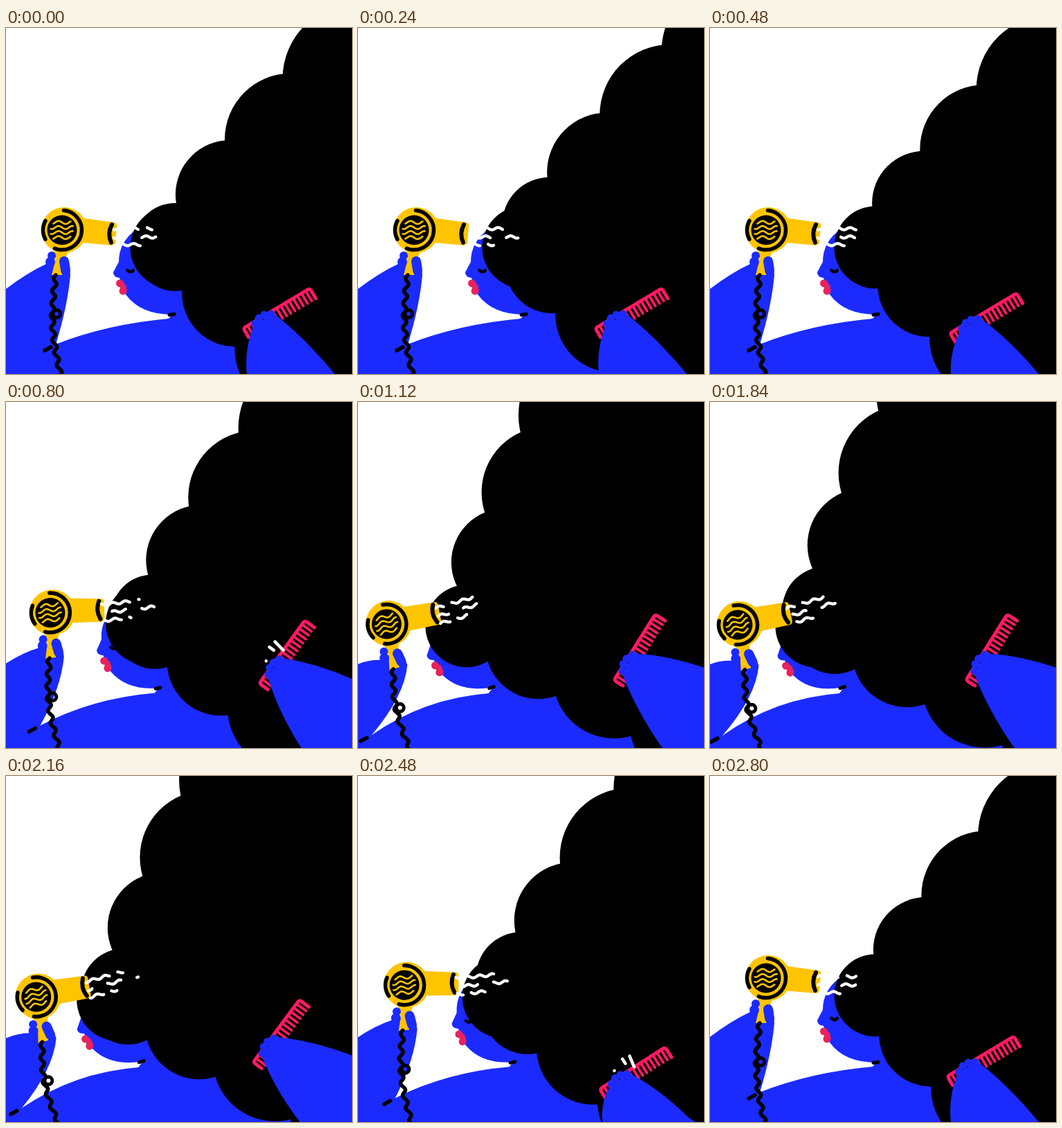
These frames come from a looping animation (500 px wide and 500 px high, 2880 ms). An HTML page with a canvas:

```html
<!DOCTYPE html>
<html lang="en">
<head>
<meta charset="utf-8">
<title>Blow-dry</title>
<style>
  html, body { margin: 0; width: 100%; height: 100%; overflow: hidden; background: #fff; }
  canvas { display: block; }
</style>
</head>
<body>
<canvas id="stage" width="500" height="500"></canvas>
<script>
const ctx = document.getElementById('stage').getContext('2d');
const LOOP = 2880, STEP = 80, TAU = 2 * Math.PI;
const BLUE = '#1b2bff', YELLOW = '#ffc400', PINK = '#ff1a64', LIPS = '#e8225e';

const rad = deg => deg * Math.PI / 180;
const mix = (a, b, k) => a + (b - a) * k;
const mixAll = (a, b, k) => a.map((v, i) => mix(v, b[i], k));
const ramp = (t, from, to) => Math.min(1, Math.max(0, (t - from) / (to - from)));
const ease = (t, from, to) => { const k = ramp(t, from, to); return k * k * (3 - 2 * k); };

// Placed parts are [x, y, turn in degrees].
const upright = { dryer: [81, 292, 0], head: [239, 317], face: [155, 356, 0], armpit: [72, 457], neck: [235, 420], cordEnd: [79, 502] };
const leaning = { dryer: [40, 322, -17], head: [154, 324], face: [98, 370, -10], armpit: [18, 482], neck: [187, 421], cordEnd: [75, 502] };
const combLow = { comb: [343, 434, -31], elbow: [475, 500], base: [348, 500] };
const combHigh = { comb: [370, 402, -58], elbow: [520, 391], base: [440, 500] };

const blend = (a, b, k) =>
  Object.fromEntries(Object.keys(a).map(part => [part, mixAll(a[part], b[part], k)]));

function place([x, y, turn = 0], draw) {
  ctx.save();
  ctx.translate(x, y);
  ctx.rotate(rad(turn));
  draw();
  ctx.restore();
}
// Local point to stage point.
function locate([x, y, turn], dx, dy) {
  const c = Math.cos(rad(turn)), s = Math.sin(rad(turn));
  return [x + dx * c - dy * s, y + dx * s + dy * c];
}
function disc(x, y, r, color) {
  ctx.fillStyle = color;
  ctx.beginPath();
  ctx.arc(x, y, r, 0, TAU);
  ctx.fill();
}
function arc(x, y, r, from, to, width) {
  ctx.strokeStyle = '#000';
  ctx.lineWidth = width;
  ctx.beginPath();
  ctx.arc(x, y, r, rad(from), rad(to));
  ctx.stroke();
}
function fill(d, color) {
  ctx.fillStyle = color;
  ctx.fill(new Path2D(d));
}
function stroke(d, color, width) {
  ctx.strokeStyle = color;
  ctx.lineWidth = width;
  ctx.stroke(new Path2D(d));
}
const polyline = points => 'M' + points.map(p => p.join()).join('L');
function wave(x0, x1, y, amp, length, phase = 0) {
  const points = [];
  for (let x = x0; x <= x1; x++) points.push([x, y + amp * Math.sin((x - phase) / length * TAU)]);
  return polyline(points);
}

// Curls are born at the head and swell as they drift out along a ray.
function curls(growth, angle, curve, taper) {
  return Array.from({ length: 6 }, (_, n) => {
    const u = growth % 1 + n, d = 100 * u + 6 * u * u, a = rad(angle + curve * d);
    return [d * Math.cos(a), d * Math.sin(a), 58 + 0.2 * d - taper * d * d];
  });
}

function drawHair(head, lean, t) {
  // Each comb stroke pushes one more curl through.
  const growth = 0.07 + 5 * t / LOOP + ease(t, 480, 1000) + ease(t, 1960, 2480);
  const top = curls(growth, mix(-42, -59.5, lean), 0, 0.00016);
  const bottom = curls(growth, mix(32.5, 12, lean), 0.028, 0.00028);
  place(head, () => {
    fill(polyline([...top.map(c => c.slice(0, 2)), [900, -500], [900, 900],
      ...bottom.map(c => c.slice(0, 2)).reverse()]) + 'Z', '#000');
    [[0, 0, 59.5], ...top, ...bottom].forEach(([x, y, r]) => disc(x, y, r, '#000'));
  });
}

function drawFace() {
  fill('M35,-66Q8,-48 8,-18L0,-3Q0,4 9,5L14,20L18,29Q39,58 85,58L92,64L140,64L140,-60Z', BLUE);
  disc(9.5, 13, 5.5, LIPS);
  disc(14, 24, 5.5, LIPS);
  fill('M10,8L18,15L20,24L10,24Z', LIPS);
  stroke('M20.5,-6Q25,-1 29,-6', '#000', 4.5);
  stroke('M81,58.5L88,57.5', '#000', 5);
}

function drawCord([x0, y0], [x1, y1]) {
  const bowed = y => {
    const s = (y - y0) / (y1 - y0);
    return mix(x0, x1, s) - 8 * Math.sin(Math.PI * s);
  };
  const points = [];
  for (let y = y0; y < y1; y++) points.push([bowed(y) - 2.8 * Math.sin((y - y0) / 18 * TAU), y]);
  stroke(polyline(points), '#000', 5.5);
  arc(bowed(y0 + 56) + 6, y0 + 56, 5.5, 0, 360, 5);
}

function drawDryer() {
  fill('M-12,28L10,28L4,45L0,65L-15,65L-10,45Z', YELLOW);
  fill('M25,-18L75,-11Q80,-11 79,-5L77,18Q76,22 72,22L25,18Z', YELLOW);
  disc(3, 0, 33, YELLOW);
  disc(0, 0, 21.5, '#000');
  for (let y = -11; y <= 11; y += 7.3) {
    const w = Math.sqrt(280 - y * y);
    stroke(wave(-w, w, y, 2.2, 20), YELLOW, 2.6);
  }
  arc(0, 0, 28.5, -85, 112, 5.5);
  arc(0, 0, 27.5, 151, 209, 5.5);
  stroke('M72,-8Q65,5 71,18', '#000', 6);
  // fingers and thumb
  disc(-15, 37, 6, BLUE);
  disc(-17, 46, 7, BLUE);
  stroke('M3,45L5,58', BLUE, 14);
}

function drawWind(t) {
  const flow = t / STEP * 6;
  // Each row: y, far end, dash period, gap, gap start
  [[-2, 131, 54, 9, 112], [10, 151, 43.2, 19, 137.5], [21, 116, 36, 8, 115]].forEach(([y, end, period, gap, start]) => {
    for (let x = (start + flow) % period + gap - period; x < end; x += period) {
      const a = Math.max(x + 2, 75), b = Math.min(x + period - gap - 2, end - 1);
      if (b >= a) stroke(wave(a, b + 0.5, y, 1.7, 18, flow), '#fff', 4.3);
    }
  });
}

function drawComb() {
  stroke('M0,15V4Q0,0 4,0H108Q112,0 112,4V17', PINK, 5);
  for (let x = 7; x < 112; x += 7) stroke(`M${x},2V17`, PINK, 3.8);
}

function drawBody([px, py], [nx, ny]) {
  fill(`M${px},${py}Q${(px + nx) / 2 - 8},428 ${nx},${ny}L${nx + 6},413L520,413L520,520L-5,520Z`, BLUE);
}

function drawDryerArm(dryer, [px, py]) {
  const [ax, ay] = locate(dryer, -21, 48), [tx, ty] = locate(dryer, 10, 45), [bx, by] = locate(dryer, 12, 65);
  fill(`M-5,381Q${ax / 2 - 3},${(381 + ay) / 2 - 5} ${ax},${ay}L${tx},${ty}L${bx},${by}` +
    `Q${bx - 4},${by + 45} ${px},${py}L${px},520L-5,520Z`, BLUE);
  stroke(`M${px - 16},${py + 9}l9,-5`, '#000', 5.5);
}

function drawCombArm(comb, [ex, ey], [bx, by]) {
  const [lx, ly] = locate(comb, 15, 4), [rx, ry] = locate(comb, 48, 3);
  fill(`M${lx},${ly}L${rx},${ry}Q${(rx + ex) / 2},${(ry + ey) / 2 - 10} ${ex},${ey}` +
    `L520,520L${bx + 6},520L${bx},${by}Q${(lx + bx) / 2 - 9},${(ly + by) / 2} ${lx},${ly}Z`, BLUE);
  place(comb, () => {
    for (let i = 0; i < 4; i++) disc(18 + 9 * i, 3 - 5 * Math.sin(i * Math.PI / 3), 5.5, BLUE);
  });
}

function draw(t) {
  const lean = ease(t, 480, 1200) - ease(t, 2020, 2775);
  const lift = ease(t, 480, 900) - ease(t, 2020, 2560);
  const { dryer, head, face, armpit, neck, cordEnd } = blend(upright, leaning, lean);
  const { comb, elbow, base } = blend(combLow, combHigh, lift);

  // The comb dips before rising and circles once on its way down.
  const dip = Math.sin(Math.PI * ramp(t, 240, 720)), turn = TAU * ramp(t, 2020, 2800);
  comb[0] += 4 * dip - 9 * Math.sin(turn);
  comb[1] += 7 * dip + 11 * (1 - Math.cos(turn));

  ctx.fillStyle = '#fff';
  ctx.fillRect(0, 0, 500, 500);
  ctx.lineCap = ctx.lineJoin = 'round';

  drawBody(armpit, neck);
  drawDryerArm(dryer, armpit);
  place(face, drawFace);
  drawHair(head, lean, t);
  place(dryer, drawDryer);
  drawCord(locate(dryer, -9, 65), cordEnd);
  place(dryer, () => drawWind(t));

  place(comb, drawComb);
  drawCombArm(comb, elbow, base);
  if ((t >= 720 && t <= 880) || (t >= 2400 && t <= 2560)) {
    place(comb, () => stroke('M32,-11v.1M51,-19L51,-11M62,-17L59,0', '#fff', 4.5));
  }
}

function tick(now) {
  draw(Math.floor(now % LOOP / STEP) * STEP);
  requestAnimationFrame(tick);
}
tick(performance.now());
</script>
</body>
</html>
```
